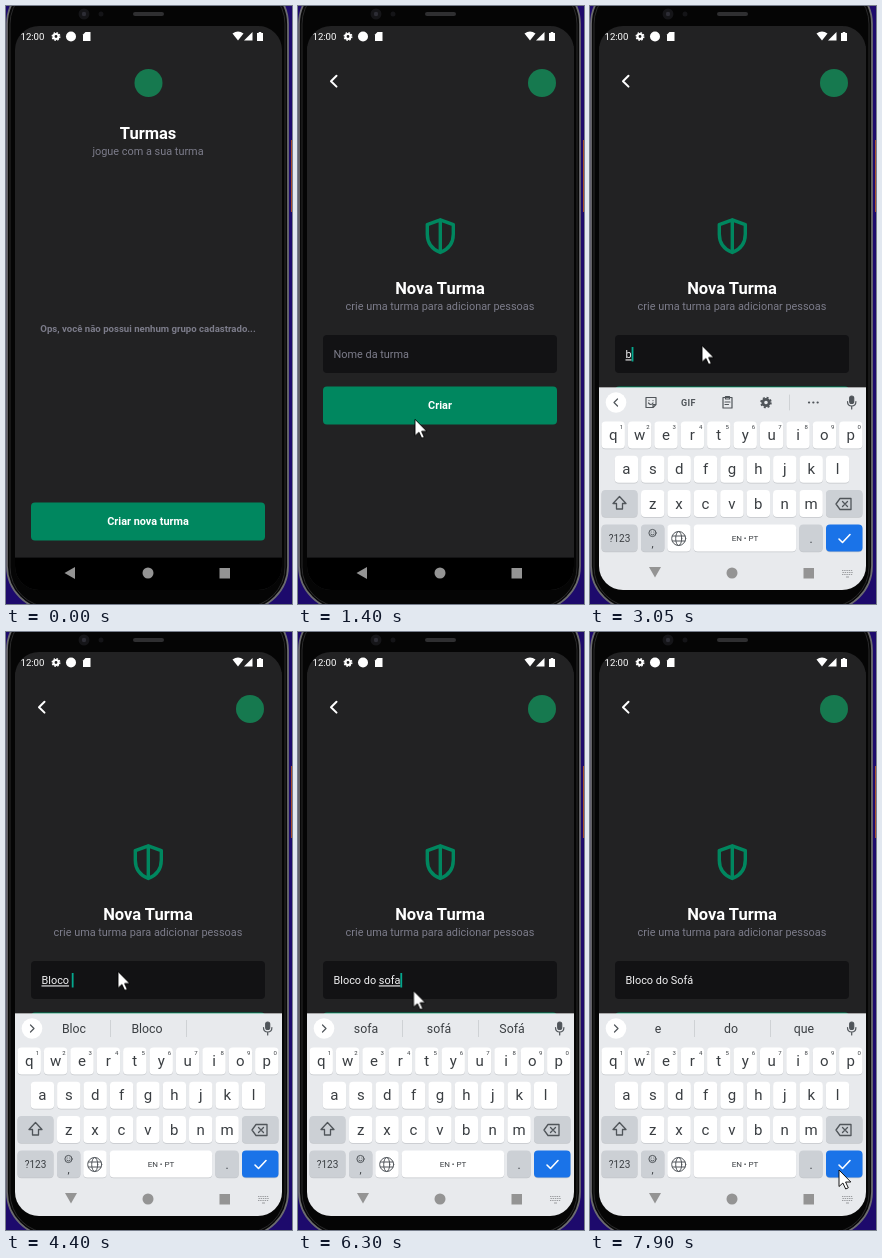
Recreate the animation shown at these times as an HTML page. Size 286x598 px, loop 8000 ms.

```html
<!DOCTYPE html>
<html lang="pt">
<head>
<meta charset="utf-8">
<title>Nova Turma</title>
<style>
html, body { margin: 0; width: 100%; height: 100%; overflow: hidden; background: #1d0a6c; }
svg { display: block; width: 100vw; height: 100vh; }
text { font-family: Roboto, sans-serif; font-size: 10.9px; white-space: pre; }
.mid { text-anchor: middle; }
.title { font-size: 16.5px; font-weight: 700; fill: #fff; }
.muted { fill: #7c7c8a; }
.bold { font-weight: 700; }
.line { fill: none; stroke-linecap: round; stroke-linejoin: round; }
.icon { fill: none; stroke: #50555a; stroke-width: 1.2; stroke-linecap: round; stroke-linejoin: round; }

#new, #press, #panel, #keyboard, #back, #ime, #pointer { animation: 8s linear infinite; }
#new { animation-name: open; }
#press { animation-name: press; }
#panel { animation-name: panel; }
#keyboard { animation-name: rise; }
#ime { animation-name: panel; }
#back { animation-name: turn; }
#pointer { animation-name: move; }
@keyframes open { 0%, 14.99% { opacity: 0 } 15% { opacity: .6 } 16.25%, 100% { opacity: 1 } }
@keyframes press { 0%, 12.49% { opacity: 1 } 12.5%, 100% { opacity: .7 } }
@keyframes panel { 0%, 25.49% { opacity: 0 } 25.5%, 100% { opacity: 1 } }
@keyframes rise {
  0%, 25.6% { transform: translateY(190px); opacity: 0 }
  26.25% { transform: translateY(149px); opacity: .13 }
  27.5% { transform: translateY(70px); opacity: .6 }
  28.75% { transform: translateY(18px); opacity: .95 }
  30%, 100% { transform: none; opacity: 1 }
}
@keyframes turn {
  0%, 25% { transform: translate(64px, 567px) rotate(0deg) }
  26.25% { transform: translate(65px, 566.5px) rotate(-40deg) }
  28.75%, 100% { transform: translate(65px, 566px) rotate(-90deg) }
}
@keyframes move {
  0%, 1.25% { transform: translate(185px, -22px) }
  6.875%, 15% { transform: translate(131px, 508px) }
  17.5% { transform: translate(117px, 413.5px) }
  21.25%, 77% { transform: translate(112px, 339.5px) }
  78.75% { transform: translate(115px, 358.5px) }
  81.25%, 90% { transform: translate(212px, 394px) }
  98.75%, 100% { transform: translate(249px, 538px) }
}
</style>
</head>
<body>
<svg viewBox="0 0 286 598" preserveAspectRatio="none">
  <defs>
    <clipPath id="screen"><rect x="9" y="20" width="267" height="564" rx="24"/></clipPath>
    <g id="gear">
      <circle r="3.2" fill="none" stroke-width="2.8"/>
      <circle r="4.9" fill="none" stroke-width="1.7" stroke-dasharray="2 1.85"/>
    </g>
  </defs>

  <rect x="285" y="134" width="1" height="72" fill="#a8502f"/>
  <rect x="1" y="-26" width="281" height="630" rx="44" fill="#080808" stroke="#6c6c6f" stroke-width="1.8"/>
  <rect x="4" y="-22" width="275" height="623" rx="40" fill="#050505" stroke="#2a2a2b"/>
  <circle cx="78" cy="8" r="5.5" fill="#151518"/>
  <circle cx="78" cy="8" r="2.2" fill="#2d2d35"/>
  <circle cx="95" cy="8" r="2.5" fill="#141417"/>
  <rect x="127" y="6" width="31" height="4" rx="2" fill="#2f2f31"/>

  <g clip-path="url(#screen)">
    <rect x="9" y="20" width="267" height="564" fill="#222223"/>

    <g id="home">
      <circle cx="142.5" cy="77" r="14" fill="#16794f"/>
      <text class="mid title" x="142" y="133">Turmas</text>
      <text class="mid muted" x="142" y="149">jogue com a sua turma</text>
      <text class="mid muted bold" x="142" y="325.5" style="font-size:9.6px">Ops, você não possui nenhum grupo cadastrado...</text>
      <g id="press">
        <rect x="25" y="496.5" width="234" height="38" rx="4" fill="#00875f"/>
        <text class="mid bold" x="142" y="519.3" fill="#fff">Criar nova turma</text>
      </g>
    </g>

    <g id="new">
      <rect x="9" y="40" width="267" height="512" fill="#222223"/>
      <path class="line" d="M38.5 69.8L33 75.2L38.5 80.6" stroke="#fff" stroke-width="2"/>
      <circle cx="244" cy="77" r="14" fill="#16794f"/>
      <path class="line" d="M142.3 213.8L155.3 218.6V228C155.3 237 150 243.500 142.300 246.500C134.600 243.500 129.300 237 129.300 228V218.600ZV246.500" stroke="#00875f" stroke-width="3.400"/>
      <text class="mid title" x="142" y="288">Nova Turma</text>
      <text class="mid muted" x="142" y="304.3">crie uma turma para adicionar pessoas</text>
      <rect x="25" y="329" width="234" height="38" rx="4" fill="#121214"/>
      <text id="hint" class="muted" x="35.5" y="352.4">Nome da turma</text>
      <text id="value" x="35.5" y="352.4" fill="#f2f2f4"><tspan></tspan><tspan text-decoration="underline"></tspan><tspan></tspan></text>
      <rect id="caret" y="341" width="1.8" height="14.5" fill="#05a78e"/>
      <rect x="25" y="380.5" width="234" height="38" rx="4" fill="#00875f"/>
      <text class="mid bold" x="142" y="403.3" fill="#fff">Criar</text>
    </g>

    <g fill="#fff">
      <text x="14.5" y="33.6" style="font-size:9.6px">12:00</text>
      <use href="#gear" transform="translate(50 30.5) scale(.78)" stroke="#fff"/>
      <circle cx="65" cy="30.5" r="5"/>
      <path d="M79.5 26H84.5V35H77V28.5Z"/>
      <path d="M226.5 27.5Q232 23.5 237.5 27.5L232 34.5Z"/>
      <path d="M246.5 26V34.5H238Z"/>
      <path d="M251 27H252.7V26H255.3V27H257V35H251Z"/>
    </g>

    <rect id="panel" x="9" y="381.6" width="267" height="171" fill="#fff"/>
    <rect x="9" y="551.6" width="267" height="33" fill="#000"/>

    <g id="keyboard">
      <rect x="9" y="381.6" width="267" height="204" fill="#e8eaed"/>
      <circle cx="26" cy="396.5" r="10.3" fill="#fff"/>
      <path id="chevron" class="icon"/>
      <g class="icon">
        <rect x="259.7" y="390" width="4" height="7.5" rx="2" fill="#50555a"/>
        <path d="M257.5 395.5Q257.5 400 261.7 400T265.9 395.5M261.7 400V403"/>
      </g>
      <g id="tools">
        <g class="icon">
          <path d="M56 391.5H66V398.5L63 401.5H56ZM66 398.5H63V401.5M58.5 397Q61 400 63 397M59 394.5V394.6M63 394.5V394.6"/>
          <path d="M133 391.5H142V402H133ZM135.5 390.5H139.5V393H135.5ZM135 396H140M135 398.5H138.5"/>
          <path d="M199.5 389V404" stroke="#cfd2d5" stroke-width="1"/>
        </g>
        <text class="mid" x="98.5" y="399.6" fill="#50555a" style="font-size:9px;font-weight:700;letter-spacing:.4px">GIF</text>
        <use href="#gear" transform="translate(176 396.5)" stroke="#50555a"/>
        <path d="M219 396.5H219.1M223.3 396.5H223.4M227.6 396.5H227.7" class="icon" style="stroke-width:2.2"/>
      </g>
      <g id="words" fill="#50555a">
        <path d="M104.5 388V405M180.5 388V405" stroke="#cfd2d5"/>
      </g>
      <g id="keys"></g>
      <g class="icon" style="stroke-width:1.3">
        <path d="M29.5 490.5L36 497.5H32.5V503H26.5V497.5H23Z"/>
        <path d="M246 498L250 492.5H261V503.5H250ZM252.5 495.5L257.5 500.5M257.5 495.5L252.5 500.5"/>
        <circle cx="62.5" cy="527" r="3.6" stroke-width="1"/>
        <path d="M60.8 528.2Q62.5 530 64.2 528.2M61.2 526V526.1M63.8 526V526.1" stroke-width=".9"/>
        <g stroke-width="1">
          <circle cx="88.7" cy="532.5" r="7"/>
          <ellipse cx="88.7" cy="532.5" rx="3" ry="7"/>
          <path d="M82.5 530H95M82.5 535H95"/>
        </g>
        <path d="M249 533L252.5 536.5L260 528.5" stroke="#fff" stroke-width="1.6"/>
      </g>
    </g>

    <g fill="#949494">
      <path id="back" d="M-5.5 0L5 -6V6Z"/>
      <circle cx="142" cy="567" r="5.5"/>
      <rect x="213.5" y="562" width="10.5" height="10.5"/>
      <g id="ime" fill="none" stroke="#9a9c9f">
        <path d="M252 564.5H263M252.5 566.5H263M252 568.5H263" stroke-dasharray="1.4 .8"/>
        <path d="M256 571H259"/>
      </g>
    </g>
  </g>

  <path id="pointer" d="M0 0V16.5L3.9 13L6.7 19L9.3 17.8L6.6 12H11.8Z" fill="#fff" stroke="#000" stroke-width=".9"/>
</svg>

<script>
const LOOP = 8000;
const $ = id => document.getElementById(id);

function add(parent, tag, attrs, content = '') {
  const node = document.createElementNS('http://www.w3.org/2000/svg', tag);
  for (const name in attrs) node.setAttribute(name, attrs[name]);
  node.textContent = content;
  return parent.appendChild(node);
}

function label(parent, x, y, size, content) {
  return add(parent, 'text', { class: 'mid', x, y, fill: '#3a3e42', style: `font-size:${size}px` }, content);
}

function key(x, y, width, fill) {
  add($('keys'), 'rect', { x, y: y + .8, width, height: 27, rx: 4, fill: '#c3c6ca' });
  add($('keys'), 'rect', { x, y, width, height: 27, rx: 4, fill });
}

const WHITE = '#fff', GREY = '#ccd0d5', PITCH = 26.4;
const letters = [];
[['qwertyuiop', 23.2, 415.5], ['asdfghjkl', 36.4, 449.7], ['zxcvbnm', 62.7, 484]].forEach(([row, left, y], r) => {
  [...row].forEach((char, i) => {
    const x = left + i * PITCH;
    key(x - 11.7, y, 23.4, WHITE);
    letters.push(label($('keys'), x, y + 18.6, 15, char));
    if (r === 0) label($('keys'), x + 8.3, y + 7.6, 6, (i + 1) % 10);
  });
});
key(11.5, 484, 36, GREY);
key(236, 484, 36.5, GREY);
key(11.5, 518.5, 36, GREY);
key(51, 518.5, 23.4, GREY);
key(77.3, 518.5, 23.4, WHITE);
key(103.7, 518.5, 102.5, WHITE);
key(209.3, 518.5, 23.4, GREY);
key(236, 518.5, 36.5, '#1a73e8');
label($('keys'), 29.5, 536, 10, '?123');
label($('keys'), 62.5, 541, 11, ',');
label($('keys'), 155, 535.3, 8, 'EN • PT');
label($('keys'), 221, 537, 12, '.');

const words = [68, 141, 214].map(x => label($('words'), x, 401, 12.3, ''));

// Time, text with "_" before the word being composed, suggestions
const STATES = [
  [0, ''],
  [1950, ''],
  [2350, ''],
  [3050, '_b'],
  [3300, ''],
  [3550, '_B'],
  [3900, '_Bl', 'Bl,Blog,Blusa'],
  [4100, '_Blo', 'Blo,Bloco,Blog'],
  [4200, '_Bloc', 'Bloc,Bloco,'],
  [4350, '_Bloco ', 'Bloc,Bloco,'],
  [4550, 'Bloco ', 'de,do,da'],
  [4750, 'Bloco d', 'de,do,da'],
  [4900, 'Bloco _d', 'd,de,do'],
  [5050, 'Bloco _do', 'do,dos,dou'],
  [5250, 'Bloco do ', 'meu,dia,que'],
  [5550, 'Bloco do _s', 's,seu,sol'],
  [5750, 'Bloco do _so', 'so,só,sol'],
  [5950, 'Bloco do _sof', 'sof,sofá,sofrer'],
  [6150, 'Bloco do _sofa', 'sofa,sofá,Sofá'],
  [7000, 'Bloco do Sofá ', 'e,do,que']
];
const [before, composing, after] = $('value').children;
let shown = null, upper = null;

function show(state) {
  const [, text, suggestions] = state;
  const [plain, word = ''] = text.split('_');
  before.textContent = plain;
  composing.textContent = word.trim();
  after.textContent = word.endsWith(' ') ? ' ' : '';
  $('hint').style.display = text ? 'none' : '';
  $('caret').setAttribute('x', 35.5 + (text ? $('value').getComputedTextLength() : 0));
  $('tools').style.display = suggestions ? 'none' : '';
  $('words').style.display = suggestions ? '' : 'none';
  const names = (suggestions || ',,').split(',');
  words.forEach((node, i) => node.textContent = names[i]);
  $('chevron').setAttribute('d', suggestions ? 'M24.5 393L28 396.5L24.5 400' : 'M27.5 393L24 396.5L27.5 400');
  shown = state;
}

function setCase(capital) {
  for (const node of letters) {
    node.textContent = capital ? node.textContent.toUpperCase() : node.textContent.toLowerCase();
  }
  upper = capital;
}

const start = performance.now();
function frame() {
  const time = (performance.now() - start) % LOOP;
  const state = STATES.findLast(([at]) => at <= time);
  if (state !== shown) show(state);
  if (upper !== time < 2850) setCase(time < 2850);
  const lit = time >= 1950 && (time - state[0]) % 1000 < 500;
  $('caret').style.visibility = lit ? 'visible' : 'hidden';
  requestAnimationFrame(frame);
}
frame();
</script>
</body>
</html>
```
